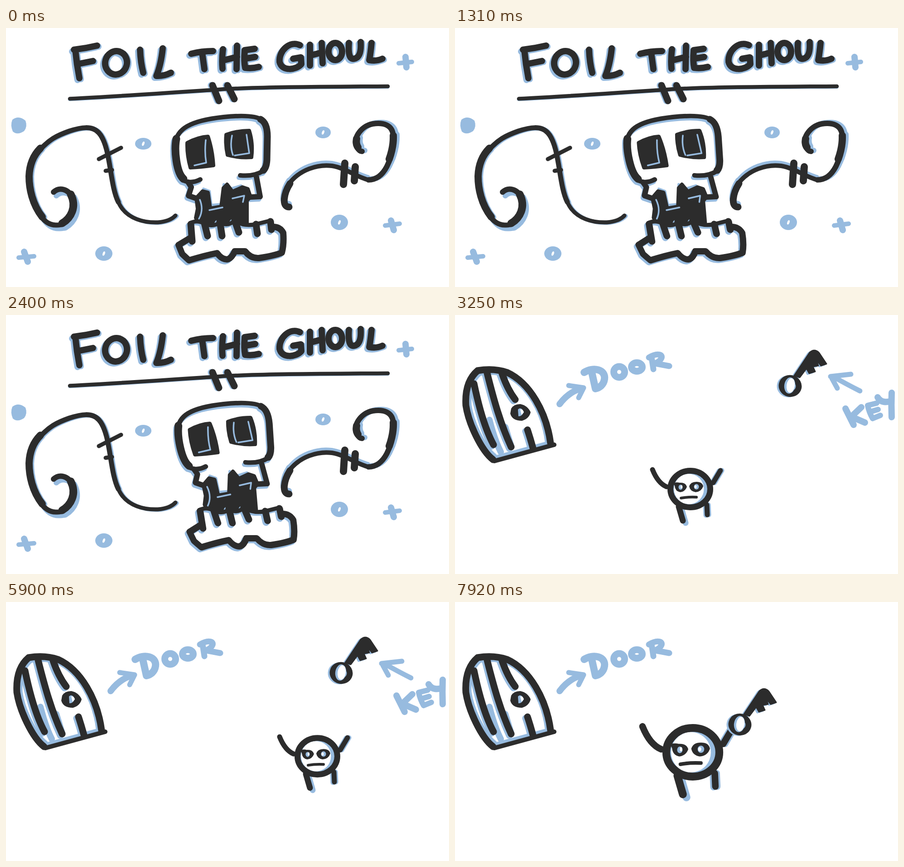
These frames come from a looping animation (978 by 573 pixels, 8000 ms). An HTML page:

```html
<!DOCTYPE html>
<html lang="en">
<head>
<meta charset="utf-8">
<title>Sketch</title>
<style>
html, body { margin: 0; width: 100%; height: 100%; overflow: hidden; background: #fff; }
svg { display: block; width: 978px; height: 573px; }
g, use { stroke-linecap: round; stroke-linejoin: round; }
.k { stroke: #2c2c2c; }
.b { stroke: #97bbdf; }
.line { fill: none; }
.dark { fill: #2c2c2c; }
.blue { fill: #97bbdf; }
.white { fill: #fff; }
</style>
</head>
<body>
<svg viewBox="0 0 978 573">
<defs>
  <g id="title" class="line" stroke-width="14">
    <path d="M153 48Q156 80 162 111M150 48Q176 45 201 39M157 80L192 73"/>
    <ellipse cx="243" cy="77" rx="24" ry="26" transform="rotate(15 243 77)"/>
    <path d="M296 48Q297 76 303 99M346 45Q342 82 332 106Q348 107 364 99"/>
    <path d="M409 57Q432 51 457 51M433 54L438 91"/>
    <path d="M479 47Q476 70 478 90M510 39L509 91M478 72L510 64"/>
    <path d="M549 46L527 49Q525 74 528 88Q544 90 558 86M527 68L550 64"/>
    <path d="M649 38C627 27 602 50 604 75C609 97 641 93 652 80L651 65L634 68"/>
    <path d="M671 37L671 83M697 33L699 78M671 61L698 54"/>
    <ellipse cx="727" cy="52" rx="15" ry="19"/>
    <path d="M757 33C755 62 760 72 772 67C783 62 784 46 783 31M807 33Q805 55 802 71Q818 74 831 68"/>
  </g>
  <path id="rule" class="line" stroke-width="8.5" d="M141 156.5C250 151 350 144 470 136C560 130 700 130 843 129"/>
  <path id="hash" class="line" stroke-width="15" d="M456 127L470 161M489 127L504 157"/>
  <g id="hook" class="line">
    <path stroke-width="12" d="M105 363C118 351 138 356 147 376"/>
    <path stroke-width="17" d="M143 368C157 396 143 421 124 432"/>
    <path stroke-width="11" d="M143 415C133 432 123 437 110 436C95 436 84 428 74 412"/>
  </g>
  <g id="tail" class="line">
    <path stroke-width="16" d="M80 418C58 390 51 355 51 328C52 300 62 280 76 266"/>
    <path stroke-width="11" d="M70 275C95 246 112 238 140 228C165 220 190 215 205 232C232 262 228 345 248 385"/>
    <path stroke-width="9" d="M248 385C265 425 310 431 335 430Q362 428 374 415"/>
  </g>
  <g id="arc" class="line">
    <path stroke-width="15" d="M625 396C608 396 613 366 627 344"/>
    <path stroke-width="10" d="M623 347C648 312 690 301 720 305C750 310 775 330 800 336"/>
  </g>
  <g id="loop" class="line">
    <path stroke-width="12" d="M800 336C835 336 855 290 855 240C854 212 830 209 810 212C780 217 764 250 775 264Q780 273 786 273"/>
    <path stroke-width="16" d="M846 290Q856 262 855 238M774 245Q772 256 777 264"/>
  </g>

  <g id="cranium" class="line">
    <path stroke-width="10" d="M429 335Q412 344 396 339C379 332 371 285 374 255C377 224 405 205 480 197Q548 190 566 204M517 326Q548 329 568 316"/>
    <path stroke-width="17" d="M392 334C376 320 371 270 376 245"/>
    <path stroke-width="15" d="M562 202Q577 210 577 240L576 292Q575 309 568 315"/>
    <path stroke-width="12" d="M402 341L409 352L403 371L420 377M553 330L561 373L540 374"/>
  </g>
  <g id="jaw" class="line">
    <path stroke-width="14" d="M406 465L381 480L389 500L404 514Q440 503 466 498Q476 512 488 512Q498 510 505 494L528 494Q540 510 558 509Q592 504 609 497Q614 478 612 453Q605 440 590 440"/>
    <path stroke-width="15" d="M408 434L411 472M438 432L445 460M472 428L477 460M505 426L514 452M552 434L555 455M584 428L586 446"/>
    <path stroke-width="9" d="M406 432Q420 424 438 432Q456 442 472 430Q490 440 505 426Q524 440 552 434L584 426"/>
  </g>

  <path id="doorFrame" class="line" stroke-width="15" d="M84 320C58 300 30 240 24 200C22 165 30 140 50 123Q85 117 115 127C165 150 202 215 211 284"/>
  <g id="bars" class="line" stroke-width="15">
    <path d="M42 152C52 200 65 250 85 287M71 129C85 185 100 240 124 292"/>
    <path d="M104 130Q116 165 133 187M160 254Q166 272 172 294"/>
  </g>
  <path id="bit" stroke-width="3" d="M749 134L783 83Q794 73 804 84L820 108L808 112L797 98L802 112L790 114L795 125L782 129L776 118L761 138Z"/>
  <ellipse id="bow" class="line" cx="740" cy="157" rx="19" ry="17.5" stroke-width="13" transform="rotate(15 740 157)"/>
  <path id="leg" class="line" stroke-width="13" d="M494 424L503 455"/>
  <path id="rightLimbs" class="line" stroke-width="11" d="M586 344L570 371M556 420L557 442"/>
</defs>

<g id="intro">
  <g class="b">
    <use href="#title" x="-4" y="4"/><use href="#title" x="3" y="2"/>
    <use href="#rule" y="1"/><use href="#hash" x="-3"/>
    <use href="#hook" x="6" y="8"/><use href="#tail" x="3" y="1"/>
    <use href="#arc" x="-1" y="-6"/><use href="#loop" x="6" y="-2"/>
    <path class="line" stroke-width="10" d="M867 78L896 75M28 508L62 505M837 437L869 433"/>
    <path class="line" stroke-width="14" d="M882 64L884 87M40 495L48 517M850 426L856 447"/>
  </g>
  <g class="k">
    <use href="#title"/><use href="#rule"/><use href="#hash"/>
    <use href="#hook"/><use href="#tail"/><use href="#arc"/><use href="#loop"/>
    <path class="line" stroke-width="9" d="M205 290L254 265M220 316L234 314"/>
    <path class="line" stroke-width="16" d="M748 299L745 346M771 307L769 338"/>
  </g>
  <path class="blue" d="M14 203Q28 192 43 205Q48 218 40 228Q25 238 15 229Q9 215 14 203Z"/>
  <g id="rings"></g>
  <g id="skull">
    <use href="#cranium" class="b" x="-3" y="5"/>
    <path class="b line" stroke-width="6" d="M436 356L449 361L453 392L476 390L481 346M495 356L519 349"/>
    <g class="dark k" stroke-width="8">
      <path d="M400 254Q425 241 446 240Q456 270 458 304Q430 308 407 309Q399 280 400 254Z"/>
      <path d="M486 236Q510 227 537 227Q546 255 542 286Q515 288 489 281Q484 260 486 236Z"/>
      <path d="M420 376L434 361L446 364L451 399L475 395L480 354L488 346L500 362L522 352L534 356L540 374L532 382L532 432L505 437L470 443L425 433L419 420L423 400Z"/>
    </g>
    <path class="b line" stroke-width="3.5" d="M441 248Q438 275 442 298L416 304M499 238Q494 262 501 281M531 236L537 277L505 282M449 403L478 397M428 380Q437 402 426 422M500 377L526 371L523 385"/>
    <path class="white" d="M406 435Q420 426 438 434Q456 444 472 432Q490 442 505 428Q524 442 552 436L584 428L613 453L609 498L558 510L528 493L505 493L488 514L466 498L403 515L380 480L405 468Z"/>
    <use href="#jaw" class="b" x="-4" y="4"/>
    <use href="#cranium" class="k"/><use href="#jaw" class="k"/>
  </g>
</g>

<g id="room">
  <use href="#doorFrame" class="b" transform="translate(7 12) scale(.94)"/>
  <path class="b line" stroke-width="10" d="M88 316L205 284"/>
  <use href="#bars" class="b" x="-4" y="3"/>
  <path class="b line" stroke-width="14" d="M76 232Q88 278 101 303M111 248L124 290"/>
  <g class="k">
    <use href="#doorFrame"/><use href="#bars"/>
    <path class="line" stroke-width="10" d="M87 323L219 287"/>
  </g>
  <path class="dark" d="M124 207Q130 197 144 197Q160 200 167 215Q164 229 148 234Q126 234 122 218Z"/>
  <path class="blue" d="M139 209Q146 202 152 215Q147 225 140 224Z"/>
  <path class="white" d="M144 209Q149 207 152 215L147 221Z"/>
  <g class="b line" stroke-width="15">
    <path stroke-width="14" d="M231 197Q250 171 279 162"/>
    <path stroke-width="11" d="M251 156L284 161L273 183"/>
    <path stroke-width="16" d="M285 127C305 114 333 120 330 142C328 155 319 161 310 163L302 127"/>
    <ellipse cx="362.5" cy="126" rx="12" ry="12"/><ellipse cx="401.5" cy="115" rx="12" ry="9.5"/>
    <path stroke-width="13" d="M434 94L438 120M428 94C448 82 461 88 455 97Q450 104 441 107L473 113"/>
  </g>
  <g id="label" class="b line" stroke-width="14">
    <path stroke-width="11" d="M894 168Q868 155 836 137M829 136L874 131M832 140L844 162"/>
    <path d="M862 207L880 243M897 204L875 225L905 238"/>
    <path stroke-width="12" d="M931 195L911 200Q914 215 922 229L939 222M917 214L934 209"/>
    <path d="M933 182Q941 196 960 191M964 172Q963 200 964 226"/>
  </g>
  <g id="hero">
    <g class="b"><use href="#leg" x="6" y="5"/><use href="#rightLimbs" x="-3" y="1"/><use href="#rightLimbs" x="3"/></g>
    <g class="k">
      <path class="line" stroke-width="11" d="M436 342Q448 372 467 380"/>
      <use href="#leg"/><use href="#rightLimbs"/>
    </g>
    <ellipse class="blue k" cx="519.5" cy="385" rx="44" ry="40.5" stroke-width="13"/>
    <ellipse class="white" cx="516.5" cy="385" rx="33" ry="33.5"/>
    <g class="dark">
      <path d="M482 372Q488 369 496 371Q509 370 512 380Q508 391 497 392Q486 390 485 378Z"/>
      <path d="M517 379Q520 369 533 369Q546 369 548 379Q544 391 531 392Q519 390 517 379Z"/>
    </g>
    <g class="blue"><ellipse cx="498" cy="381" rx="4.5" ry="5.5"/><ellipse cx="533" cy="380" rx="5.5" ry="6"/></g>
    <g class="white"><ellipse cx="500" cy="380" rx="2" ry="3.5"/><ellipse cx="531" cy="380" rx="2.5" ry="3.5"/></g>
    <path class="k line" stroke-width="6" d="M499 405Q515 402 533 403"/>
  </g>
  <g id="key">
    <use href="#bit" class="b blue" x="-4" y="2"/>
    <use href="#bow" class="b" x="-4" y="1"/>
    <use href="#bit" class="k dark"/><use href="#bow" class="k"/>
    <ellipse class="blue" cx="739" cy="156" rx="12" ry="18" transform="rotate(8 739 156)"/>
    <ellipse class="white" cx="741" cy="156" rx="9" ry="16" transform="rotate(8 741 156)"/>
  </g>
</g>
</svg>
<script>
const $ = id => document.getElementById(id);
const show = (id, on) => $(id).setAttribute('display', on ? 'inline' : 'none');
const place = (id, value) => $(id).setAttribute('transform', value);
const mix = (a, b, u) => a + (b - a) * u;

// Blue rings with a small slanted hole
$('rings').innerHTML = [[303, 256, 18, 13], [700, 231, 17, 13], [736, 430, 19, 17], [216, 499, 19, 16]]
  .map(([x, y, rx, ry]) => `<ellipse class="blue" cx="${x}" cy="${y}" rx="${rx}" ry="${ry}"/>
    <ellipse class="white" cx="${x}" cy="${y}" rx="2.5" ry="5" transform="rotate(20 ${x} ${y})"/>`).join('');

// Progress in even jumps; the first jump lands at "from"
function steps(t, from, to, count) {
  const gap = (to - from) / (count - 1);
  return Math.min(count, Math.max(0, Math.floor((t - from) / gap + 1.001))) / count;
}

function heroPose(t) {
  if (t < 6370) {
    const u = steps(t, 5740, 6060, 5);
    return [173 * (1 - (1 - u) ** 3.86), -57 * (1 - (1 - u) ** 1.6), t >= 4730 && t < 5360 ? 1.33 : 1];
  }
  if (t < 6920) {
    const u = steps(t, 6370, 6840, 7);
    return [mix(173, 150, u), mix(-57, -157, u), 1];
  }
  const u = steps(t, 7300, 7920, 9);
  return [mix(150, 3, u ** 1.1), mix(-157, -47, u ** 0.82), 1.33];
}

function draw(t) {
  const intro = t < 3250;
  show('intro', intro);
  show('room', !intro);
  if (intro) {
    const beat = Math.floor((t + 22) / 77.75);
    const lean = 0.0885 * (1 - Math.cos(beat * 2 * Math.PI / 7)) / 2;
    place('skull', `matrix(1 0 ${lean} 1 ${-190 * lean} 0)`);
    return;
  }
  const [x, y, size] = heroPose(t);
  const held = t >= 6920;
  place('hero', `translate(${512 + x} ${402 + y}) scale(${size}) translate(-512 -402)`);
  place('key', held ? `translate(${x - 114} ${y + 161})` : '');
  show('label', !held);
}

function tick() {
  draw(performance.now() % 8000);
  requestAnimationFrame(tick);
}
tick();
</script>
</body>
</html>
```
